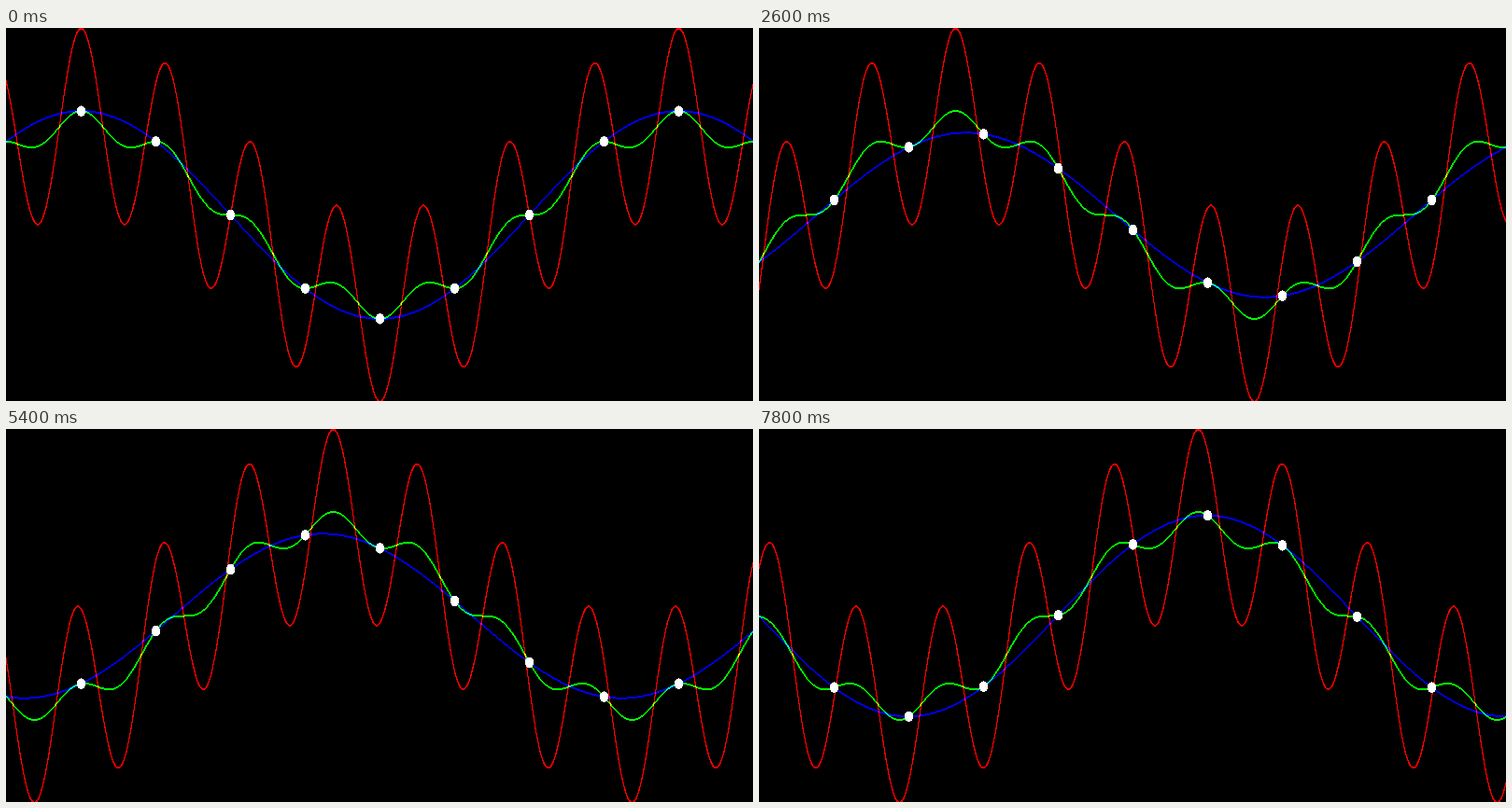
Recreate the animation shown at these times as a matplotlib script. Size 800 by 400 pixels, loop 8 s.

```python
import numpy as np
import matplotlib.pyplot as plt
from matplotlib.animation import FuncAnimation

W, H = 800, 400
FRAMES, INTERVAL = 40, 200
PERIOD, SPACING = 640, 80      # wavelength and sampling step in px
HARMONIC, AMP = 7, 100
START, SPEED = 80, 10          # first crest and px per frame

k = 2 * np.pi / PERIOD
# A moving average over one sampling step damps each partial by a sinc.
low = AMP * np.sinc(SPACING / PERIOD)
high = AMP * np.sinc(HARMONIC * SPACING / PERIOD)

knots = np.arange(-1, W + 2)
fine = np.arange(-1, W + 1, 0.05) + 0.025
rows, cols = np.mgrid[0:H, 0:W]


def signal(x, crest):
    u = k * (x - crest)
    return H / 2 - AMP * (np.cos(u) + np.cos(HARMONIC * u))


def filtered(x, crest):
    u = k * (x - crest)
    return H / 2 - low * np.cos(u) - high * np.cos(HARMONIC * u)


def rebuilt(x, crest):
    # The sampled harmonic aliases down to the base frequency.
    alias = np.cos(k * (x + HARMONIC * crest))
    return H / 2 - low * np.cos(k * (x - crest)) - high * alias


def plot(img, channel, y):
    """Join whole-pixel points, two rows thick, in one colour channel."""
    px = np.round(fine).astype(int)
    py = np.round(np.interp(fine, knots, np.floor(y))).astype(int)
    for row in (py, py + 1):
        ok = (px >= 0) & (px < W) & (row >= 0) & (row < H)
        img[row[ok], px[ok], channel] = 255


def dot(img, x, y):
    inside = ((cols - x) / 4.7) ** 2 + ((rows - y) / 5.7) ** 2 <= 1
    img[inside] = 255


def render(frame):
    crest = START + SPEED * frame
    img = np.zeros((H, W, 3), np.uint8)
    for channel, curve in enumerate((signal, filtered, rebuilt)):
        plot(img, channel, curve(knots, crest))
    for x in range(SPACING, W, SPACING):
        dot(img, x, filtered(x, crest))
    return img


fig = plt.figure(figsize=(W / 100, H / 100), dpi=100, facecolor="black")
ax = fig.add_axes([0, 0, 1, 1])
ax.axis("off")
view = ax.imshow(render(0), interpolation="nearest", aspect="auto")


def update(frame):
    view.set_data(render(frame))
    return [view]


anim = FuncAnimation(fig, update, frames=FRAMES, interval=INTERVAL,
                     repeat=True, repeat_delay=0, blit=False)
plt.show()
```
